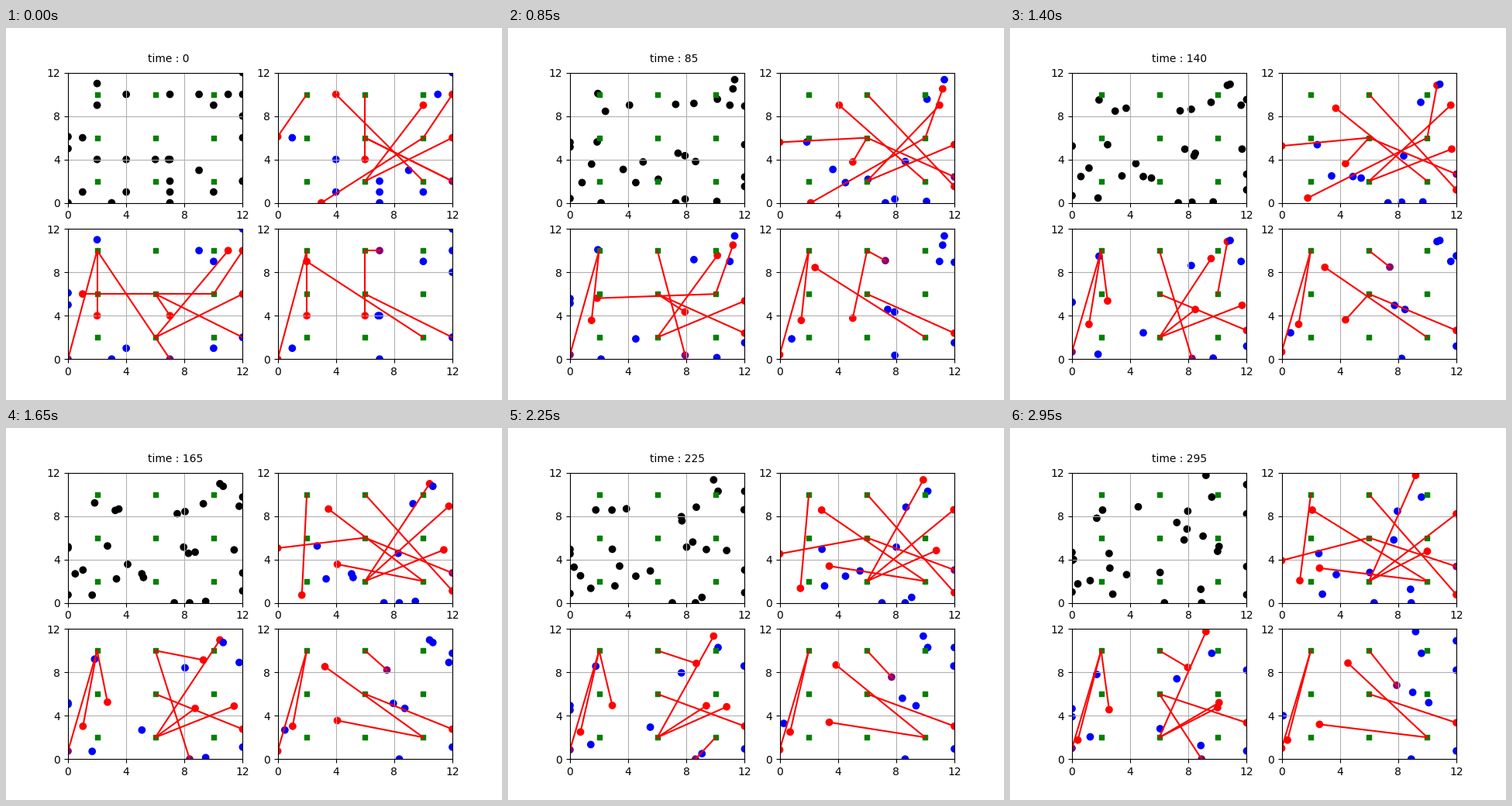
Animation, 640 px wide and 480 px high, one loop 3 s. Source, as a matplotlib script:

```python
import itertools

import numpy as np
import matplotlib.pyplot as plt
from matplotlib.animation import FuncAnimation

FRAMES, INTERVAL, STEP = 60, 50, 5
TIMES = np.arange(FRAMES) * STEP
SIZE = 12

# Fixed stations on a 3 x 3 grid, named by compass direction.
SPOTS = list(itertools.product((2, 6, 10), repeat=2))
SW, W, NW, S, C, N, SE, E, NE = SPOTS

ORDER = ["red", "blue", "purple"]
IDLE = ("blue", [])
paths, roles = [], []


def walk(*points, **role):
    """Steady walk through evenly timed points, held inside the field."""
    knots = np.linspace(0, TIMES[-1], len(points))
    path = [np.interp(TIMES, knots, axis) for axis in zip(*points)]
    paths.append(np.clip(path, 0, SIZE))
    roles.append(role)


def link(first, *switches, color="red"):
    return color, [(0, first), *switches]


def shared(*plan):
    return link(*plan, color="purple")


# Panel a, b and c each follow their own group of walkers.
# Left side
walk((0, 6.1), (0, 5.2), (0, 3.9), a=link(NW, (65, C)), b=IDLE)
walk((0, 5), (0, 5.25), (0, 4.65), b=IDLE)
walk((0, 0), (0, 0.7), (0, 1), b=shared(NW), c=link(NW))
walk((1, 1), (0.8, 2), (0.35, 3), (0.1, 4), c=IDLE)
walk((1, 6), (2, 5.55), (3.05, 5.1), (2.55, 4.55),
     a=IDLE, b=link(E, (25, W), (65, E), (110, NW)))
walk((2, 4), (1.4, 3.5), (0.85, 2.8), (0.4, 1.75), b=link(NW), c=link(NW))
walk((3, 0), (2, 0), (1.5, 1.05), (1.25, 2.05),
     a=link(E, (165, NW)), b=IDLE)

# Upper middle
walk((2, 11), (1.7, 7.8), b=IDLE)
walk((2, 9), (2.5, 8.35), (3.6, 8.6), (4.55, 8.85), c=link(SE))
walk((4, 10), (4.1, 8.85), (3.2, 8.55), (2.1, 8.55), a=link(SE))
walk((7, 10), (7.9, 6.8), c=shared(N))
walk((9, 10), (8.15, 8.55), (7.2, 7.4), b=IDLE)
walk((11, 10), (7.95, 8.45), a=IDLE, b=link(S, (165, N)))

# Lower middle
walk((4, 4), (2.8, 0.8), a=IDLE)
walk((4, 1), (4.6, 2), (5.3, 3), (6.05, 2.8), a=IDLE, b=IDLE)
walk((6, 4), (2.6, 3.2),
     a=link(N, (65, C), (165, SE)), c=link(N, (115, C), (165, SE)))
walk((6.9, 4), (7.8, 5), (9, 6.15), c=IDLE)
walk((7, 4), (10.1, 5.2), b=link(C, (115, S)), c=IDLE)
walk((7, 2), (3.75, 2.6), a=IDLE)
walk((7, 1), (7.3, -0.2), (7.3, 0), (6.35, 0), a=IDLE)
walk((7, 0), (8.05, 0.4), (8.5, -0.4), (8.9, 0),
     a=IDLE, b=shared(NW, (65, N), (225, SE), (280, C)), c=IDLE)
walk((9, 3), (7.7, 5.8), a=IDLE)
walk((10, 1), (10.1, 0), (9.15, 0.2), (8.85, 1.25), a=IDLE, b=IDLE)

# Right side
walk((10, 9), (11.7, 9), (12.2, 8.2), a=link(S), b=IDLE, c=IDLE)
walk((12, 12), (9.6, 9.75), a=IDLE, b=IDLE, c=IDLE)
walk((12, 10), (9.2, 11.75),
     a=link(E, (165, S)), b=link(E, (165, S)), c=IDLE)
walk((12, 8), (12, 9.6), (12, 10.9), c=IDLE)
walk((13.2, 6), (11.6, 4.9), (10, 4.75), a=link(S), b=link(S))
walk((12, 2), (12, 1.15), (12, 0.75),
     a=link(C, (25, SE), (65, N)), b=IDLE, c=IDLE)
walk((12, 2), (12, 3.35), a=shared(C), b=link(C), c=link(C))

paths = np.array(paths)


def members(panel):
    """Index, colour and station plan of a panel's walkers, in paint order."""
    rows = [(i, *role[panel]) for i, role in enumerate(roles) if panel in role]
    return sorted(rows, key=lambda row: ORDER.index(row[1]))


def station_at(plan, t):
    return [spot for start, spot in plan if start <= t][-1]


def setup(ax, colors):
    ticks = range(0, SIZE + 1, 4)
    ax.set(xlim=(0, SIZE), ylim=(0, SIZE), xticks=ticks, yticks=ticks)
    ax.grid(True)
    dots = ax.scatter(np.zeros(len(colors)), np.zeros(len(colors)), c=colors)
    ax.scatter(*zip(*SPOTS), s=20, c="green", marker="s")
    return dots


fig, axes = plt.subplots(2, 2, figsize=(6.4, 4.8), dpi=100)
main, *rest = axes.flat
all_dots = setup(main, ["black"] * len(paths))
label = main.text(5.5, 13, "")

panels = []
for ax, name in zip(rest, "abc"):
    rows = members(name)
    dots = setup(ax, [color for _, color, _ in rows])
    links = [(ax.plot([], [], color="red")[0], i, plan)
             for i, _, plan in rows if plan]
    panels.append((dots, [i for i, _, _ in rows], links))


def update(frame):
    t = TIMES[frame]
    pos = paths[:, :, frame]
    label.set_text(f"time : {t}")
    all_dots.set_offsets(pos)
    for dots, ids, links in panels:
        dots.set_offsets(pos[ids])
        for line, i, plan in links:
            line.set_data(*zip(pos[i], station_at(plan, t)))
    return []


anim = FuncAnimation(fig, update, frames=FRAMES, interval=INTERVAL,
                     repeat=True, repeat_delay=0)
plt.show()
```
